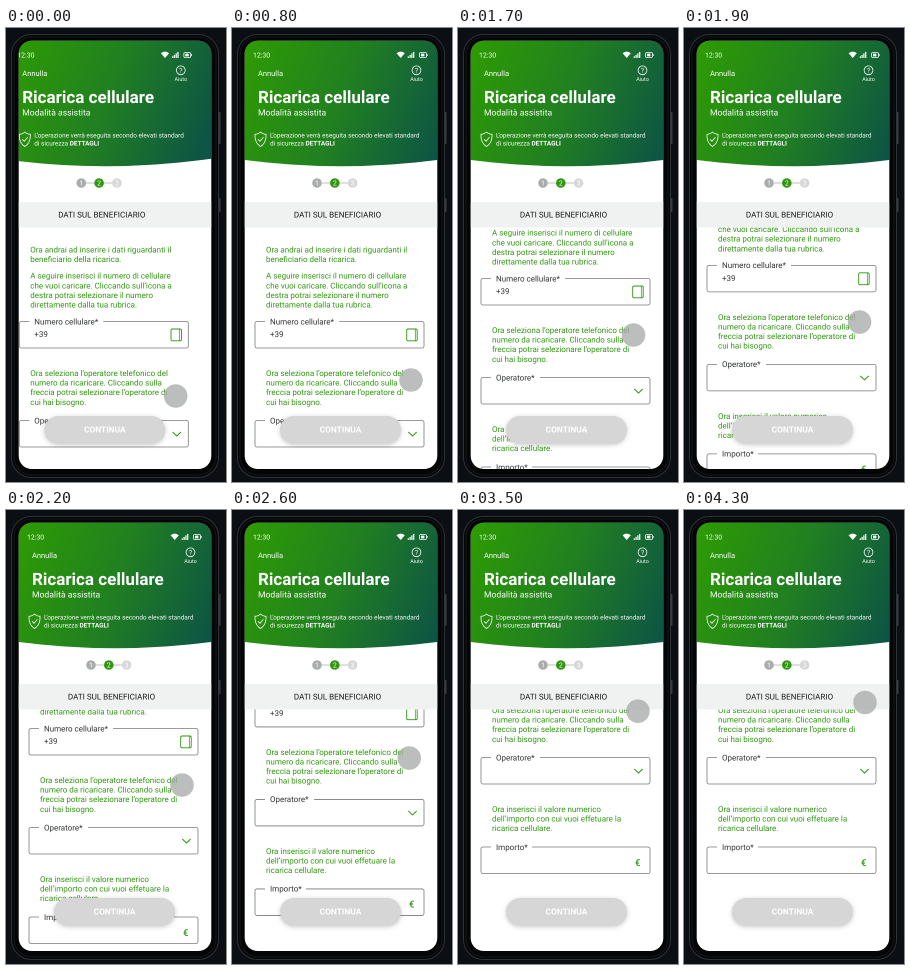
Animation, 220 px wide and 454 px high, one loop 4.5 s. Source, as an HTML page with a canvas:

```html
<!DOCTYPE html>
<html lang="it">
<head>
<meta charset="utf-8">
<title>Ricarica cellulare</title>
<style>
html, body { margin: 0; width: 100%; height: 100%; overflow: hidden; background: #0b0e13; }
canvas { display: block; width: 220px; height: 454px; }
</style>
</head>
<body>
<canvas id="stage"></canvas>
<script>
const LOOP = 4500, STEP = 100;
const GREEN = '#2f960f', DARK = '#303333';
const canvas = document.getElementById('stage');
const ctx = canvas.getContext('2d');
// Double resolution keeps small text free of hinting
const ratio = 2 * (window.devicePixelRatio || 1);
canvas.width = 220 * ratio;
canvas.height = 454 * ratio;
ctx.textRendering = 'geometricPrecision';

// Key poses as [ms, value]
const slideKeys = [[0, -9.7], [100, -4], [200, -1.2], [300, 0]];
const scrollKeys = [[900, 0], [1100, 3], [1300, 13], [1700, 43], [2200, 75], [3100, 133], [3500, 145]];
const touchXKeys = [[0, 169.7], [300, 179], [1300, 179], [1700, 175.5], [2200, 176], [3100, 179], [4300, 181]];
const touchYKeys = [[0, 368], [800, 352], [1300, 334], [1700, 307], [2200, 275], [3100, 218], [3600, 199], [4300, 192.5]];

// Monotone cubic through the key poses
function sample(keys, t) {
  const last = keys.length - 1;
  if (t <= keys[0][0]) return keys[0][1];
  if (t >= keys[last][0]) return keys[last][1];
  const slope = i => (keys[i + 1][1] - keys[i][1]) / (keys[i + 1][0] - keys[i][0]);
  const tangent = i => {
    if (i === 0 || i === last) return 0;
    const a = slope(i - 1), b = slope(i);
    return a * b <= 0 ? 0 : 2 * a * b / (a + b);
  };
  let i = 0;
  while (t > keys[i + 1][0]) i++;
  const [t0, v0] = keys[i], [t1, v1] = keys[i + 1];
  const d = t1 - t0, u = (t - t0) / d, w = 1 - u;
  return v0 * (1 + 2 * u) * w * w + v1 * u * u * (3 - 2 * u)
    + d * (tangent(i) * u * w * w - tangent(i + 1) * u * u * w);
}

function text(str, x, y, size, color, weight = 400, align = 'left') {
  ctx.font = `${weight} ${size}px Roboto, sans-serif`;
  ctx.fillStyle = color;
  ctx.textAlign = align;
  ctx.fillText(str, x, y);
}

function lines(list, x, y, size = 8, lead = 9.6, color = GREEN) {
  list.forEach((str, i) => text(str, x, y + i * lead, size, color));
}

function box(x, y, w, h, r, fill) {
  ctx.beginPath();
  ctx.roundRect(x, y, w, h, r);
  ctx.fillStyle = fill;
  ctx.fill();
}

function frame(x, y, w, h, r, color, width) {
  ctx.beginPath();
  ctx.roundRect(x, y, w, h, r);
  ctx.strokeStyle = color;
  ctx.lineWidth = width;
  ctx.stroke();
}

function disc(x, y, r, fill) {
  ctx.beginPath();
  ctx.arc(x, y, r, 0, 7);
  ctx.fillStyle = fill;
  ctx.fill();
}

function stroke(d, color, width = 1) {
  ctx.strokeStyle = color;
  ctx.lineWidth = width;
  ctx.stroke(new Path2D(d));
}

function field(label, y, gap) {
  frame(23, y, 169, 26.5, 2, '#777b7b', 0.8);
  ctx.fillStyle = '#fff';
  ctx.fillRect(33, y - 2, gap, 4);
  text(label, 38, y + 2.8, 8, DARK);
}

function form(scroll) {
  ctx.save();
  ctx.beginPath();
  ctx.rect(0, 199, 220, 243);
  ctx.clip();
  ctx.translate(0, -scroll);

  lines(['Ora andrai ad inserire i dati riguardanti il', 'beneficiario della ricarica.'], 34, 224.5);
  lines(['A seguire inserisci il numero di cellulare', 'che vuoi caricare. Cliccando sull’icona a',
    'destra potrai selezionare il numero', 'direttamente dalla tua rubrica.'], 34, 250.7);
  field('Numero cellulare*', 293.5, 74);
  text('+39', 38, 309.2, 8, DARK);
  frame(174.7, 301, 10.5, 11.8, 1.4, GREEN, 0.9);
  stroke('M183.3 301V312.8', GREEN, 0.7);

  lines(['Ora seleziona l’operatore telefonico del', 'numero da ricaricare. Cliccando sulla',
    'freccia potrai selezionare l’operatore di', 'cui hai bisogno.'], 34, 348);
  field('Operatore*', 392.5, 49);
  stroke('M176.3 404L180.5 408L184.7 404', GREEN);

  lines(['Ora inserisci il valore numerico', 'dell’importo con cui vuoi effetuare la', 'ricarica cellulare.'], 34, 447);
  field('Importo*', 482, 41);
  text('€', 177, 500.8, 9.5, GREEN, 500);
  ctx.restore();
}

function status() {
  text('12:30', 21, 29.3, 6.9, '#fff');
  ctx.fillStyle = '#fff';
  ctx.fill(new Path2D('M164.6 25.3Q168.7 22 172.8 25.3L168.7 30Z'));
  for (let i = 0; i < 4; i++) box(175.7 + i * 1.8, 28.4 - i * 1.5, 1.2, 1.6 + i * 1.5, 0.2, '#fff');
  frame(187.6, 24.6, 6.8, 4.8, 1, '#fff', 0.8);
  box(189, 25.6, 3.4, 2.8, 0.4, '#fff');
  box(194.8, 26, 0.8, 2, 0.2, '#fff');
}

function header() {
  const fade = ctx.createLinearGradient(10, 45, 207, 118);
  fade.addColorStop(0, '#2d9a06');
  fade.addColorStop(0.5, '#217f22');
  fade.addColorStop(1, '#0d5545');
  ctx.fillStyle = fade;
  ctx.fill(new Path2D('M0 0H230V129L205 132Q109 144.5 13 132L0 129Z'));
  status();

  text('Annulla', 26, 48, 7.5, '#fff');
  ctx.beginPath();
  ctx.arc(184.5, 42.3, 4.4, 0, 7);
  ctx.strokeStyle = '#fff';
  ctx.lineWidth = 0.8;
  ctx.stroke();
  text('?', 184.5, 44.9, 7, '#fff', 400, 'center');
  text('Aiuto', 184.5, 52.8, 5.4, '#fff', 400, 'center');

  text('Ricarica cellulare', 26, 75, 17, '#fff', 700);
  text('Modalità assistita', 26, 87.7, 8.6, '#fff');
  stroke('M28.5 104Q31 106.3 34 106.3C34.3 112 32.5 116 28.5 118.5C24.5 116 22.7 112 23 106.3Q26 106.3 28.5 104ZM26 111.3L28 113.3L31.4 109.3', '#fff', 0.8);
  lines(['L’operazione verrà eseguita secondo elevati standard', 'di sicurezza '], 38, 109.7, 6.42, 7.8, '#fff');
  const lead = ctx.measureText('di sicurezza ').width;
  text('DETTAGLI', 38 + lead, 117.5, 6.42, '#fff', 700);
}

function steps() {
  stroke('M89.7 155H98.3M107.5 155H116', '#a9acac', 0.8);
  ['#a9acac', GREEN, '#d6d8d8'].forEach((fill, i) => {
    const x = 85 + i * 17.8;
    disc(x, 155, 4.8, fill);
    text(i + 1, x, 157.5, 7, '#fff', 400, 'center');
  });
}

function button() {
  ctx.save();
  ctx.shadowColor = 'rgba(0,0,0,.2)';
  ctx.shadowBlur = 4 * ratio;
  ctx.shadowOffsetY = ratio;
  box(48, 388, 121, 28, 14, '#d5d6d5');
  ctx.restore();
  text('CONTINUA', 108.5, 404.5, 8.4, '#fff', 700, 'center');
}

function phone() {
  ctx.fillStyle = '#0b0e13';
  ctx.fillRect(0, 0, 220, 454);
  box(212.5, 84, 2, 32, 1, '#3a3d41');
  box(212.5, 170, 2, 14, 1, '#3a3d41');
  box(5.5, 6.5, 207, 443, 20, '#040506');
  frame(5.5, 6.5, 207, 443, 20, '#303337', 1);
  frame(8, 9, 202, 438, 18, '#15181b', 1);
}

function draw(t) {
  ctx.setTransform(ratio, 0, 0, ratio, 0, 0);
  phone();
  ctx.save();
  ctx.beginPath();
  ctx.roundRect(12.7, 12.7, 192.6, 428.3, 13);
  ctx.clip();
  ctx.fillStyle = '#fff';
  ctx.fillRect(0, 0, 220, 454);

  ctx.save();
  ctx.translate(sample(slideKeys, t), 0);
  form(sample(scrollKeys, t));
  header();
  steps();
  ctx.fillStyle = '#f0f2f2';
  ctx.fillRect(0, 174, 230, 25.5);
  text('DATI SUL BENEFICIARIO', 105.5, 189.7, 8.05, '#181a1a', 400, 'center');
  button();
  ctx.restore();

  disc(sample(touchXKeys, t), sample(touchYKeys, t), 11.8, 'rgba(170,172,172,.78)');
  ctx.restore();
}

function tick() {
  const t = performance.now() % LOOP;
  draw(Math.floor(t / STEP) * STEP);
  requestAnimationFrame(tick);
}
tick();
</script>
</body>
</html>
```
